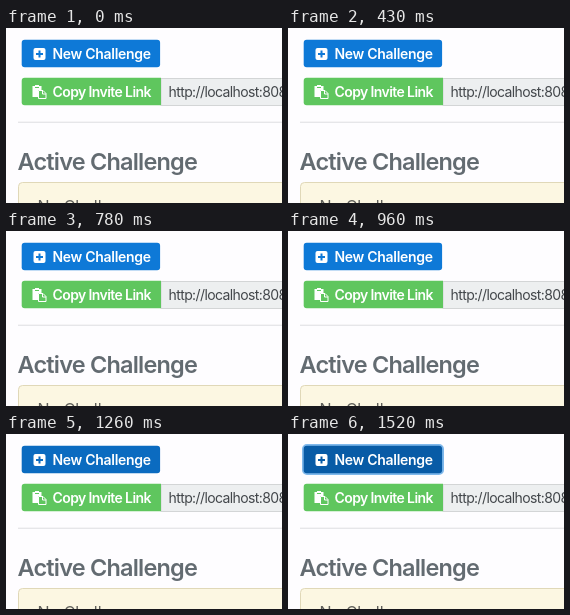
Animation of 276 by 175 pixels, one loop 1560 ms. Source, as an HTML page:

```html
<!DOCTYPE html>
<html lang="en">
<head>
<meta charset="utf-8">
<title>Challenge page</title>
<style>
  html, body { margin: 0; height: 100%; overflow: hidden; background: #fefdff; }
  svg { display: block; width: 100vw; height: 100vh; }
  text { font: 14px Inter, sans-serif; letter-spacing: -.6px; }
  .label { font-weight: 600; fill: #fff; }
  .wide { letter-spacing: -.3px; }
  .heading { font-size: 23.5px; font-weight: 600; letter-spacing: -.8px; fill: #636b71; }
  .note { font-size: 16px; letter-spacing: 0; fill: #5f5f5a; }
</style>
</head>
<body>
<svg viewBox="0 0 276 175">
  <rect id="ring" x="15" y="11" width="140" height="29" rx="4" fill="none" stroke="#0275d8" stroke-width="2"/>
  <rect id="button" x="15.7" y="11.8" width="138.4" height="27.4" rx="3"/>
  <rect x="27.5" y="20" width="12" height="12" rx="2" fill="#fff"/>
  <path id="plus" d="M33.5 22.5v7M30 26h7" stroke-width="2"/>
  <text class="label wide" x="46.5" y="31">New Challenge</text>

  <path d="M155 50.5H280V77.5H155z" fill="#edeff0" stroke="#d3d5d6"/>
  <path d="M155 49.8H18.7a3 3 0 0 0-3 3V74.2a3 3 0 0 0 3 3H155z" fill="#5fc65e"/>
  <path d="M26.5 58H29v-1h4v1h2.5v4H32v7h-5.5z" fill="#fff"/>
  <path d="M29 59.5h4" stroke="#5fc65e"/>
  <path d="M32.5 62.5h4.5l3 3v5h-7.5zM36.5 62.5v3.5h3.5" fill="#5fc65e" stroke="#fff"/>
  <text class="label" x="46.5" y="68.5">Copy Invite Link</text>
  <text x="162.5" y="68.5" fill="#43474b">http://localhost:8080</text>

  <path d="M12 94.2H276" stroke="#dddde0"/>
  <text class="heading" x="11.5" y="142">Active Challenge</text>
  <rect x="12.5" y="154.5" width="280" height="50" rx="4" fill="#fcf7e2" stroke="#e0d8b8"/>
  <text class="note" x="31.5" y="184">No Challenge</text>
</svg>
<script>
  const LOOP = 1560, HOVER = 1190, FOCUS = 1370, FADE = 150;
  const [ring, button, plus] = ["ring", "button", "plus"].map(id => document.getElementById(id));

  const fade = (time, start) => {
    const p = Math.min(1, Math.max(0, (time - start) / FADE));
    return p * p * (3 - 2 * p);
  };
  const mix = (a, b, p) => Math.round(a + (b - a) * p);

  function draw(now) {
    const time = now % LOOP;
    const hover = fade(time, HOVER);
    const color = `rgb(${mix(14, 8, hover)}, ${mix(121, 91, hover)}, ${mix(215, 166, hover)})`;
    button.setAttribute("fill", color);
    plus.setAttribute("stroke", color);
    ring.setAttribute("opacity", fade(time, FOCUS) * .5);
    requestAnimationFrame(draw);
  }
  draw(performance.now());
</script>
</body>
</html>
```
